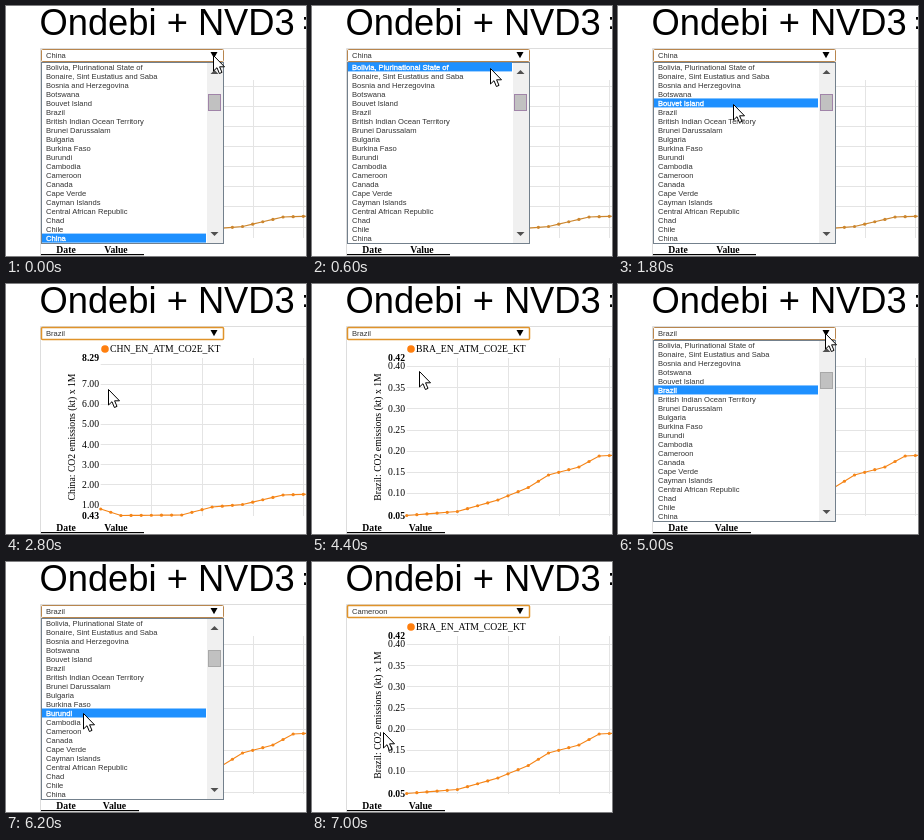
An HTML page for the animation above (8 s loop, 300 by 250 pixels).

```html
<!DOCTYPE html>
<html lang="en">
<head>
<meta charset="utf-8">
<title>Chart with country picker</title>
<style>
html, body { margin: 0; width: 100%; height: 100%; overflow: hidden; background: #fff; }
svg { display: block; width: 300px; height: 250px; }
.sans { font-family: "Liberation Sans", Arial, sans-serif; }
.title { font-size: 36.3px; }
.ui { font-size: 7.6px; fill: #333; }
.serif { font-family: "Liberation Serif", "Times New Roman", serif; font-size: 9.7px; fill: #000; }
.bold { font-weight: bold; }
.grid line { stroke: #e4e4e4; }
.on { fill: #fff; stroke: #fff; stroke-width: .35px; }
</style>
</head>
<body>
<svg id="stage" viewBox="0 0 300 250"></svg>
<script>
const LOOP = 8000, TICK = 200;
const ROW = 9.01, LIST_TOP = 56.8;
const LEFT = 94.7, STEP = 10.13, TOP = 74, BOTTOM = 232, POINTS = 22;

const countries = ["Bolivia, Plurinational State of", "Bonaire, Sint Eustatius and Saba",
  "Bosnia and Herzegovina", "Botswana", "Bouvet Island", "Brazil",
  "British Indian Ocean Territory", "Brunei Darussalam", "Bulgaria", "Burkina Faso",
  "Burundi", "Cambodia", "Cameroon", "Canada", "Cape Verde", "Cayman Islands",
  "Central African Republic", "Chad", "Chile", "China"];

// curve: point index, height on the stage
const charts = {
  China: { code: "CHN", min: .43, max: 8.29, unit: 1, edge: 138, value: 110,
    curve: [[0, 225], [2, 231.5], [8, 231], [11, 223], [14, 220.5], [18, 211], [21, 210]] },
  Brazil: { code: "BRA", min: .0457, max: .419, unit: .05, edge: 133, value: 108.5,
    curve: [[0, 231.5], [5, 227.5], [9, 216], [12, 203.5], [14, 191], [17, 183], [19, 172], [21, 171]] }
};

// pointer path: time, x, y
const path = [[0, 207, 49], [600, 178, 62], [1400, 122, 94], [1600, 122, 94], [1800, 115, 98],
  [2400, 102, 105], [4200, 102, 105], [4400, 107, 87], [5000, 207, 49], [5200, 207, 49],
  [5600, 85, 109], [6400, 74, 165], [6800, 71, 170]];

// linear interpolation between rows keyed by their first entry
function along(keys, at) {
  const i = keys.findIndex(k => k[0] > at);
  if (i < 0) return keys[keys.length - 1].slice(1);
  const a = keys[i - 1], b = keys[i], p = (at - a[0]) / (b[0] - a[0]);
  return a.slice(1).map((v, j) => v + (b[j + 1] - v) * p);
}

const stage = document.getElementById("stage");

function set(el, attrs) {
  for (const k in attrs) el.setAttribute(k, attrs[k]);
}
function add(parent, tag, attrs, text) {
  const el = document.createElementNS("http://www.w3.org/2000/svg", tag);
  set(el, attrs);
  if (text !== undefined) el.textContent = text;
  parent.appendChild(el);
  return el;
}
const group = (parent, cls) => add(parent, "g", { class: cls || "" });
const label = (parent, x, y, text, cls, anchor) =>
  add(parent, "text", { x, y, class: cls, "text-anchor": anchor || "start" }, text);
const rect = (parent, x, y, width, height, fill, stroke) =>
  add(parent, "rect", { x, y, width, height, fill, stroke: stroke || "none" });
const show = (el, on) => set(el, { display: on ? "inline" : "none" });
const snap = v => Math.round(v) + .5;

// heading and frame
const title = label(stage, 33.5, 29, "Ondebi + NVD3 ", "sans title");
add(title, "tspan", { dx: -2.5 }, "= Charts");
add(stage, "path", { d: "M300 42.5H34.5V250", fill: "none", stroke: "#ddd" });

function makeChart(name) {
  const c = charts[name], g = group(stage), grid = group(g, "grid");
  const toY = v => BOTTOM - (v - c.min) / (c.max - c.min) * (BOTTOM - TOP);
  const number = (v, cls) => label(g, 93, toY(v) + 3.3, v.toFixed(2), "serif " + cls, "end");
  for (let i = 5; i < POINTS; i += 5) {
    const x = snap(LEFT + i * STEP);
    add(grid, "line", { x1: x, x2: x, y1: TOP, y2: BOTTOM });
  }
  for (let n = Math.ceil(c.min / c.unit); n * c.unit < c.max; n++) {
    const v = n * c.unit, y = toY(v);
    add(grid, "line", { x1: LEFT, x2: 300, y1: snap(y), y2: snap(y) });
    if (Math.min(y - TOP, BOTTOM - y) > 7) number(v, "");
  }
  number(c.min, "bold");
  number(c.max, "bold");
  add(g, "circle", { cx: 99, cy: 65, r: 3.8, fill: "#ff7f0e" });
  label(g, 104, 68.3, c.code + "_EN_ATM_CO2E_KT", "serif");
  add(g, "text", { class: "serif", "text-anchor": "middle", transform: "translate(69 153) rotate(-90)" },
    name + ": CO2 emissions (kt) x 1M");
  label(g, 60, 247, "Date", "serif bold", "middle");
  label(g, c.value, 247, "Value", "serif bold", "middle");
  rect(g, 35, 248, c.edge - 35, 1.2, "#000");
  return g;
}
const views = { China: makeChart("China"), Brazil: makeChart("Brazil") };

const line = add(stage, "polyline", { fill: "none", "stroke-width": 1.1 });
const dots = Array.from({ length: POINTS }, (_, i) =>
  add(stage, "circle", { cx: LEFT + i * STEP, r: 1.6 }));

// select box
const box = add(stage, "rect", { x: 35.5, y: 43.5, width: 182, height: 12, rx: 1, fill: "#fff" });
const choice = label(stage, 40, 52, "", "sans ui");
add(stage, "path", { d: "M204.5 46H211.5L208 52.3Z" });

// drop-down list
const list = group(stage);
rect(list, 35.5, 56.5, 182, 181, "#fff", "#73808c");
rect(list, 201, 57, 16, 180, "#f0f0f0");
add(list, "path", { d: "M204.5 68L208.5 64L212.5 68ZM204.5 226H212.5L208.5 230Z", fill: "#505050" });
const thumb = rect(list, 202.5, 88.5, 12, 16, "#c1c1c1");
const mark = rect(list, 36, 0, 164, ROW, "#1e90ff");
const items = countries.map((name, i) =>
  label(list, 40, LIST_TOP + i * ROW + 7.2, name, "sans ui"));

const pointer = add(stage, "path", {
  d: "M.5 .5V16L4 12.7L6.4 18.5L9 17.4L6.6 11.8H11.5Z",
  fill: "#fff", stroke: "#000", "stroke-linejoin": "round"
});

function draw(time) {
  const t = Math.floor(time / TICK) * TICK;
  const [x, y] = along(path, t);
  const open = t < 2800 || (t >= 5000 && t < 7000);
  const chosen = t < 2800 ? "China" : t < 7000 ? "Brazil" : "Cameroon";
  const mix = t < 3800 ? 0 : t < 4000 ? .5 : 1;
  const color = t < 2800 ? "#cc862e" : "#f58518";

  show(views.China, !mix);
  show(views.Brazil, mix);
  const ys = dots.map((_, i) => {
    const [a] = along(charts.China.curve, i), [b] = along(charts.Brazil.curve, i);
    return a + (b - a) * mix;
  });
  set(line, { points: ys.map((v, i) => `${LEFT + i * STEP},${v}`).join(" "), stroke: color });
  dots.forEach((d, i) => set(d, { cy: ys[i], fill: color }));

  choice.textContent = chosen;
  set(box, { stroke: open ? "#b8864e" : "#e0932a", "stroke-width": open ? 1 : 1.5 });
  show(list, open);
  const row = y < LIST_TOP ? countries.indexOf(chosen) : Math.floor((y - LIST_TOP) / ROW);
  set(mark, { y: LIST_TOP + row * ROW - .4 });
  items.forEach((el, i) => set(el, { class: i === row ? "sans ui on" : "sans ui" }));
  set(thumb, { stroke: mix ? "#a8a8a8" : "#a084a8" });
  set(pointer, { transform: `translate(${Math.round(x)} ${Math.round(y)})` });
}

const start = performance.now();
function tick(now) {
  draw(Math.max(0, now - start) % LOOP);
  requestAnimationFrame(tick);
}
draw(0);
requestAnimationFrame(tick);
</script>
</body>
</html>
```
